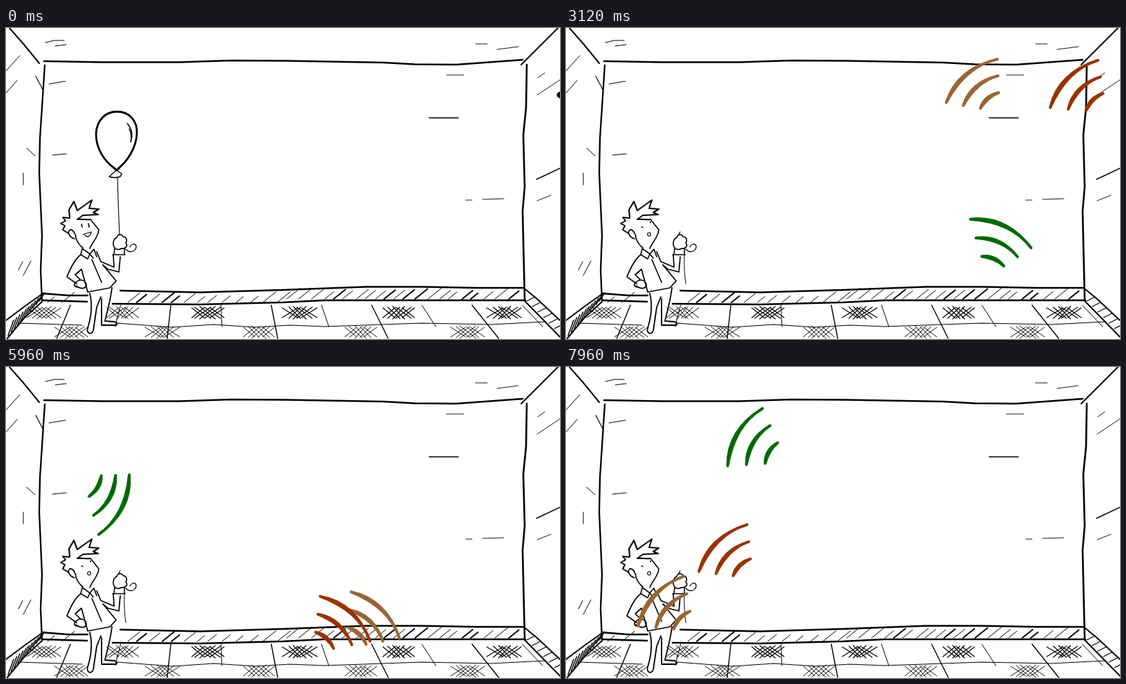
Recreate the animation shown at these times as an HTML page with a canvas. Size 800 px wide and 450 px high, loop 8000 ms.

```html
<!DOCTYPE html>
<html lang="en">
<head>
<meta charset="utf-8">
<title>Balloon pop</title>
<style>
  html, body { margin: 0; width: 100%; height: 100%; overflow: hidden; background: #fff; }
  canvas { display: block; width: 800px; height: 450px; }
</style>
</head>
<body>
<canvas id="stage" width="800" height="450"></canvas>
<script>
const LOOP = 8000, POP = 760, SURPRISE = 880, LAG = 40;

const clamp01 = v => Math.min(1, Math.max(0, v));
const line = (x1, y1, x2, y2) => `M${x1} ${y1}L${x2} ${y2}`;

function pen(ctx) {
  ctx.lineCap = ctx.lineJoin = 'round';
  ctx.strokeStyle = ctx.fillStyle = '#000';
  return (width, path) => {
    ctx.lineWidth = width;
    ctx.stroke(new Path2D(path));
  };
}

function seeded(seed) {
  return () => (seed = (seed * 16807) % 2147483647) / 2147483647;
}

function drawWalls(draw) {
  draw(2.5, 'M55 48L140 49.5L250 49.5L325 47L405 47.5L545 50L590 52.5L650 53L746 46');
  draw(2.6, 'M752 53L751 115L747 155L749 230L746 265L749 393');
  draw(2.3, 'M56 54L49 160L48 210L52 300L50 350L52 395');
  draw(2, 'M5 0L26 24L48 51M797 0L772 25L744 53');
  draw(1.2, 'M43 70L53 89');
  draw(1, 'M57 21l13 -3h14M71 26l16 -2M62 81l24 -4M67 184l20 -2M0 62l20 -22M0 94l16 -18M30 174l12 11M25 210v17M18 350l6 -12M25 358l11 -21');
  draw(0.9, 'M678 23h17M709 31l31 -4M636 68h25M768 72l10 -7M767 97l33 -22M767 250l20 -8M664 249h9M688 248l31 -1');
  draw(1.4, 'M611 130h42M766 219l34 -16');
}

function drawSkirting(draw, rnd) {
  draw(2.3, 'M52 384L90 387H118M165 380L280 382.5L400 379L520 374.5H600L680 376H748');
  draw(2.6, 'M52 394L117 396M154 399L280 400L400 397L460 394H750');
  draw(2, 'M52 385L28 402L0 423M52 396L26 420L2 449M750 378L768 393L800 423M749 395L800 447');
  for (let x = 60; x < 735; x += 12 + rnd() * 9) {
    if (x > 100 && x < 165) continue;
    const h = 8 + rnd() * 8;
    const y = x < 400 ? 397 : 392;
    draw(rnd() < 0.25 ? 2 : 1, line(x, y, x + h * 1.25, y - h));
  }
  for (let i = 0; i < 11; i++) {
    const x = 3 + i * 4.5, y = 445 - i * 5;
    draw(1.5, line(x, y, x + 8, y - 22 + i));
  }
  for (let i = 0; i < 6; i++) {
    const x = 752 + i * 8, y = 395 + i * 8;
    draw(1.2, line(x, y, x + 12, y - 6));
  }
}

function drawFloor(draw, rnd) {
  draw(1.1, 'M18 427L110 430M160 427L240 433L300 429L360 433L410 430L460 432L600 427L700 429L780 425');
  // joints fan out from the middle; every other one stops at the cross line
  for (let i = 0; i < 10; i++) {
    const x = 93 + 72.5 * i, lean = (x - 290) * 0.1, end = i % 2 ? 0.65 : 1;
    draw(i % 2 ? 1 : 1.4, line(x, 401, x + lean * end, 401 + 48 * end));
  }
  for (let i = 0; i < 6; i++) {
    hatch(55 + 108 * i + 5 * i * i, 412, i > 1 ? 1.2 : 1);
    if (i < 5) hatch(95 + 127 * i + 4 * i * i, 440, 0.9);
  }
  function hatch(cx, cy, width) {
    for (let i = -2; i <= 2; i++) {
      const x = cx + i * 7, k = 8 + rnd() * 4, h = 9 - Math.abs(i);
      draw(width, line(x - k, cy + h, x + k, cy - h));
      draw(width, line(x - k, cy - h, x + k, cy + h));
    }
  }
}

function drawBoy(draw) {
  // hair and head
  draw(2.1, 'M92 274L91 263L98 251L103 264L124 249L120 261L134 262L126 267L133 270L111 271L103 277');
  draw(1.9, 'M92 275L82 274L86 279L79 283L85 286L82 292L90 297M103 277C111 276 117 278 122 277');
  draw(1.6, 'M122 277L134 292C133 303 125 309 121 319M99 305C92 303 88 296 92 292C97 291 101 299 101 304Q104 313 111 318');
  // collar and jacket
  draw(1.6, 'M110 319L108 328L118 334L121 327L127 320L131 331M110 319L121 327L126 333M124 335L138 368');
  draw(1.7, 'M108 328C100 334 94 345 88 360L102 370M109 349L100 357L107 364M109 349L118 382L150 376L159 366L140 343');
  draw(1.6, 'M101 373C107 377 114 379 116 372C116 366 108 362 102 367C98 370 97 374 103 375');
  // raised arm
  draw(1.7, 'M131 324L137 338L156 346L155 329M140 343L147 349L163 353L165 331M154 328H172');
  draw(1.6, 'M156 327L157 318C153 313 155 305 160 303C162 297 167 298 169 302C173 302 176 306 173 311C177 315 172 320 167 319C162 322 158 320 157 318M171 319V328');
  draw(1.2, 'M173 320C179 327 188 323 188 316C187 311 181 312 179 317');
  // legs
  draw(1.8, 'M121 384C125 400 123 418 118 434C116 442 123 445 126 438L131 404L137 389M153 376C151 394 146 410 143 424L157 425C162 427 161 431 155 430H138L138 392');
}

function drawFace(draw, surprised) {
  if (surprised) {
    draw(2, 'M110 288v.5M122 281v.5');
    draw(1.2, 'M120 296C123 296 123 301 120 301C117 301 117 296 120 296');
  } else {
    draw(1.6, 'M109 284l1 4M119 283l1 5');
    draw(1.3, 'M111 299L123 295C122 301 118 304 114 300');
  }
}

function drawBalloon(draw) {
  draw(2.8, 'M158 204C142 193 130 175 130 153C131 133 144 121 160 121C178 121 190 134 189 153C188 173 176 193 160 205');
  draw(1.5, 'M175 138C181 145 184 154 180 165C182 157 180 150 178 146');
  draw(1.5, 'M155 203L160 207L164 203M158 207L149 215Q157 218 165 215L167 211L160 206');
}

// The string slips down through the fist once the balloon is gone.
function drawString(draw, t) {
  const fall = clamp01((t - POP) / 160), hang = clamp01((t - POP - 120) / 160);
  const top = 217 + 78 * fall * fall;
  draw(1.1, `M${161 + 4 * fall} ${top}Q162 ${(top + 300) / 2} 164 300`);
  if (hang > 0) draw(1, `M171 327Q170 ${327 + 25 * hang} ${171 + 2 * hang} ${327 + 43 * hang}`);
}

function drawPellet(ctx, t) {
  const u = t / POP, x = 805 - 620 * u;
  if (x < -12) return;
  ctx.beginPath();
  ctx.ellipse(x, 97 - 90 * u + 143 * u * u, 9, 5.5, 0, 0, Math.PI * 2);
  ctx.fill();
}

// Distance travelled along each axis at the key times; walls fold it back into the room.
const keys = [800, 2040, 3120, 4840, 5960, 6720, 7960];
const room = { left: 20, top: 15, width: 750, height: 395 };
const waves = [
  { color: '#996633', x: [140, 524, 942, 1577, 2022, 2330, 2892], y: [640, 1059, 1528, 2315, 2825, 3115, 3635] },
  { color: '#993300', x: [-140, 317, 795, 1485, 1978, 2290, 2802], y: [150, 297, 733, 1507, 2030, 2397, 2922] },
  { color: '#006a00', x: [140, 410, 613, 1162, 1647, 2072, 2772], y: [150, 664, 1309, 2130, 2560, 2655, 3080] }
];

function travel(values, t) {
  let i = 0;
  while (i < keys.length - 2 && t > keys[i + 1]) i++;
  const u = (t - keys[i]) / (keys[i + 1] - keys[i]);
  return values[i] + (values[i + 1] - values[i]) * u;
}

function bounce(values, t, size) {
  const d = travel(values, t);
  const lap = Math.floor(d / size), rest = d - lap * size;
  const back = lap % 2 !== 0;
  const speed = travel(values, t + 350) - travel(values, t - 350);
  return { at: back ? size - rest : rest, speed: back ? -speed : speed };
}

function drawArc(ctx, x, y, angle, length) {
  const half = length / 2, bulge = half * 0.27;
  ctx.save();
  ctx.translate(x, y);
  ctx.rotate(angle);
  ctx.beginPath();
  ctx.moveTo(-bulge, -half);
  ctx.quadraticCurveTo(bulge + 1, -half * 0.1, -bulge, half);
  ctx.quadraticCurveTo(bulge - 4, half * 0.15, -bulge, -half);
  ctx.lineWidth = 4;
  ctx.fill();
  ctx.stroke();
  ctx.restore();
}

function drawWaves(ctx, t) {
  for (const wave of waves) {
    ctx.fillStyle = ctx.strokeStyle = wave.color;
    for (let i = 0; i < 3; i++) {
      const time = t - i * LAG;
      if (time < keys[0]) break;
      const x = bounce(wave.x, time, room.width);
      const y = bounce(wave.y, time, room.height);
      const grow = Math.min(1, 0.3 + (time - keys[0]) / 300);
      drawArc(ctx, room.left + x.at, room.top + y.at,
        Math.atan2(y.speed, x.speed), 97 * (1 - 0.32 * i) * grow);
    }
  }
}

const backdrop = document.createElement('canvas');
backdrop.width = 800;
backdrop.height = 450;
const paint = pen(backdrop.getContext('2d'));
const rnd = seeded(41);
drawWalls(paint);
drawSkirting(paint, rnd);
drawFloor(paint, rnd);
drawBoy(paint);

const ctx = document.getElementById('stage').getContext('2d');
const start = performance.now();

function render() {
  const t = (performance.now() - start) % LOOP;
  ctx.fillStyle = '#fff';
  ctx.fillRect(0, 0, 800, 450);
  ctx.drawImage(backdrop, 0, 0);
  const draw = pen(ctx);
  drawFace(draw, t >= SURPRISE);
  drawString(draw, t);
  if (t < POP) drawBalloon(draw);
  drawPellet(ctx, t);
  drawWaves(ctx, t);
  requestAnimationFrame(render);
}
render();
</script>
</body>
</html>
```
